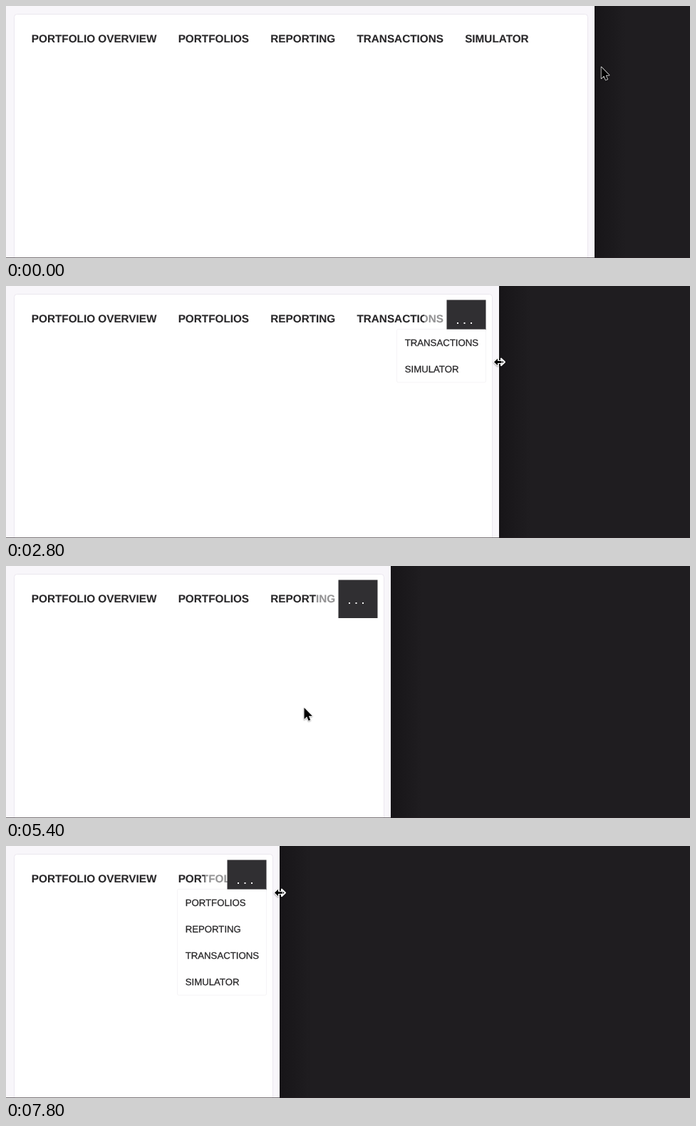
These frames come from a looping animation (960 by 353 pixels, 8000 ms). An HTML page with a canvas:

```html
<!DOCTYPE html>
<html lang="en">
<head>
<meta charset="utf-8">
<title>Collapsing navigation</title>
<style>
  html, body { margin: 0; width: 960px; height: 353px; overflow: hidden; background: #1f1d20; }
  canvas { display: block; }
</style>
</head>
<body>
<canvas id="stage" width="960" height="353"></canvas>
<script>
const ctx = document.getElementById('stage').getContext('2d');
ctx.textRendering = 'geometricPrecision';

const LOOP = 8000, STEP = 100;
const FAMILY = ' "Liberation Sans", Arial, sans-serif';
const NAV_FONT = 'bold 15.3px' + FAMILY, MENU_FONT = '13.2px' + FAMILY;
const GAP = 30.2, FADE = 32, ROW = 37;

// Eased moves: [start, end, ...target]
const POINTER_START = [835, 85], POINTER = [
  [0, 600, 827, 97],
  [1200, 2100, 695, 104],
  [2700, 2800, 692, 106],
  [2800, 3500, 543, 114],
  [4600, 5100, 418, 198],
  [5700, 6000, 508, 45],
  [6400, 6700, 541, 60],
  [6900, 7000, 537, 57],
  [7300, 7567, 384, 65]
];
const EDGE_START = [826], EDGE = [
  [1280, 2100, 692],
  [2800, 3500, 540],
  [7342, 7700, 384]
];

const ease = p => p * p * (3 - 2 * p);
const progress = (t, start, end) => Math.min(1, Math.max(0, (t - start) / (end - start)));

function follow(from, moves, t) {
  return moves.reduce((pos, [start, end, ...target]) => {
    const p = ease(progress(t, start, end));
    return pos.map((v, i) => v + (target[i] - v) * p);
  }, from).map(Math.round);
}

// The page is laid out again one step after a drag of the edge has ended.
const layoutWidth = t => follow(EDGE_START, EDGE.filter(m => m[1] + STEP <= t), t)[0];

ctx.font = NAV_FONT;
let nextX = 35.8;
const ITEMS = ['PORTFOLIO OVERVIEW', 'PORTFOLIOS', 'REPORTING', 'TRANSACTIONS', 'SIMULATOR']
  .map(label => {
    const x = nextX, end = x + ctx.measureText(label).width;
    nextX = end + GAP;
    return { label, x, end };
  });

function box(color, x, y, w, h) {
  ctx.fillStyle = color;
  ctx.fillRect(x, y, w, h);
}

function panel(border, x, y, w, h, r) {
  ctx.beginPath();
  ctx.roundRect(x, y, w, h, r);
  ctx.fillStyle = '#fff';
  ctx.fill();
  ctx.strokeStyle = border;
  ctx.lineWidth = 1;
  ctx.stroke();
}

function text(str, x, y, font, weight) {
  ctx.font = font;
  ctx.fillStyle = ctx.strokeStyle = '#29282a';
  ctx.lineWidth = weight;
  ctx.fillText(str, x, y);
  ctx.strokeText(str, x, y);
}

function drawNav(width, open) {
  const left = width - 73;
  const collapsed = ITEMS.some(item => item.end > left);
  ctx.save();
  if (collapsed) {
    ctx.beginPath();
    ctx.rect(0, 0, left, 353);
    ctx.clip();
  }
  for (const { label, x } of ITEMS) text(label, x, 51, NAV_FONT, 0.1);
  if (collapsed) box('rgba(255,255,255,.5)', left - FADE, 20, FADE, 53);
  ctx.restore();
  if (!collapsed) return;

  box('#302f32', left - 0.5, 19.5, 55, 53.5);
  for (let i = 0; i < 3; i++) box('#f4f4f4', left + 14 + 9.5 * i, 51, 2, 2);
  if (open) drawMenu(ITEMS.filter(item => item.end > left - FADE), width);
}

function drawMenu(rows, width) {
  panel('#f5f4f6', width - 143.5, 60.5, 125, ROW * rows.length + 0.5, 2);
  box('#777678', width - 73.5, 60, 55, 1);
  rows.forEach(({ label }, i) => text(label, width - 132.3, 84 + ROW * i, MENU_FONT, 0.3));
}

function drawDark(edge) {
  const shade = ctx.createLinearGradient(edge, 0, edge + 44, 0);
  shade.addColorStop(0, '#171518');
  shade.addColorStop(1, '#1f1d20');
  box(shade, edge, 0, 960 - edge, 353);
}

function pointerPath(resize) {
  const path = new Path2D();
  if (!resize) return new Path2D('M0 0V16L3.7 12.6 6.2 18.2 8.7 17.1 6.4 11.7 11.3 11.4Z');
  for (const side of [-1, 1]) {
    path.lineTo(7.5 * side, 0);
    path.lineTo(2.5 * side, 4.8 * side);
    path.lineTo(2.5 * side, 1.4 * side);
    path.lineTo(-2.5 * side, 1.4 * side);
    path.lineTo(-2.5 * side, 4.8 * side);
  }
  for (const side of [-1, 1]) {
    path.moveTo(7.5 * side, 0);
    path.lineTo(2.5 * side, -4.8);
    path.lineTo(2.5 * side, 4.8);
    path.closePath();
  }
  path.rect(-3, -1.4, 6, 2.8);
  return path;
}

function drawPointer(x, y, resize) {
  const path = pointerPath(resize);
  ctx.save();
  ctx.translate(x + 0.5, y + 0.5);
  ctx.lineJoin = 'round';
  ctx.shadowColor = 'rgba(0,0,0,.4)';
  ctx.shadowBlur = 2;
  ctx.shadowOffsetY = 1;
  ctx.strokeStyle = '#fff';
  ctx.lineWidth = resize ? 2 : 1.4;
  ctx.stroke(path);
  ctx.shadowColor = 'transparent';
  ctx.fillStyle = '#000';
  ctx.fill(path);
  ctx.restore();
}

function draw(t) {
  const [edge] = follow(EDGE_START, EDGE, t);
  const [x, y] = follow(POINTER_START, POINTER, t);
  const width = layoutWidth(t);
  const open = t < 5400 || t >= 6300;
  const resize = t >= 500 && t < 4700 || t >= 6700;

  box('#f8f6fa', 0, 0, 960, 353);
  panel('#ebe7ef', 11.5, 11.5, width - 21, 360, 4);
  drawNav(width, open);
  drawDark(edge);
  box('rgba(40,32,37,.6)', 0, 352, 960, 1);
  drawPointer(x, y, resize);
}

const start = performance.now();
function tick() {
  const t = (performance.now() - start) % LOOP;
  draw(Math.floor(t / STEP) * STEP);
  requestAnimationFrame(tick);
}
tick();
</script>
</body>
</html>
```
